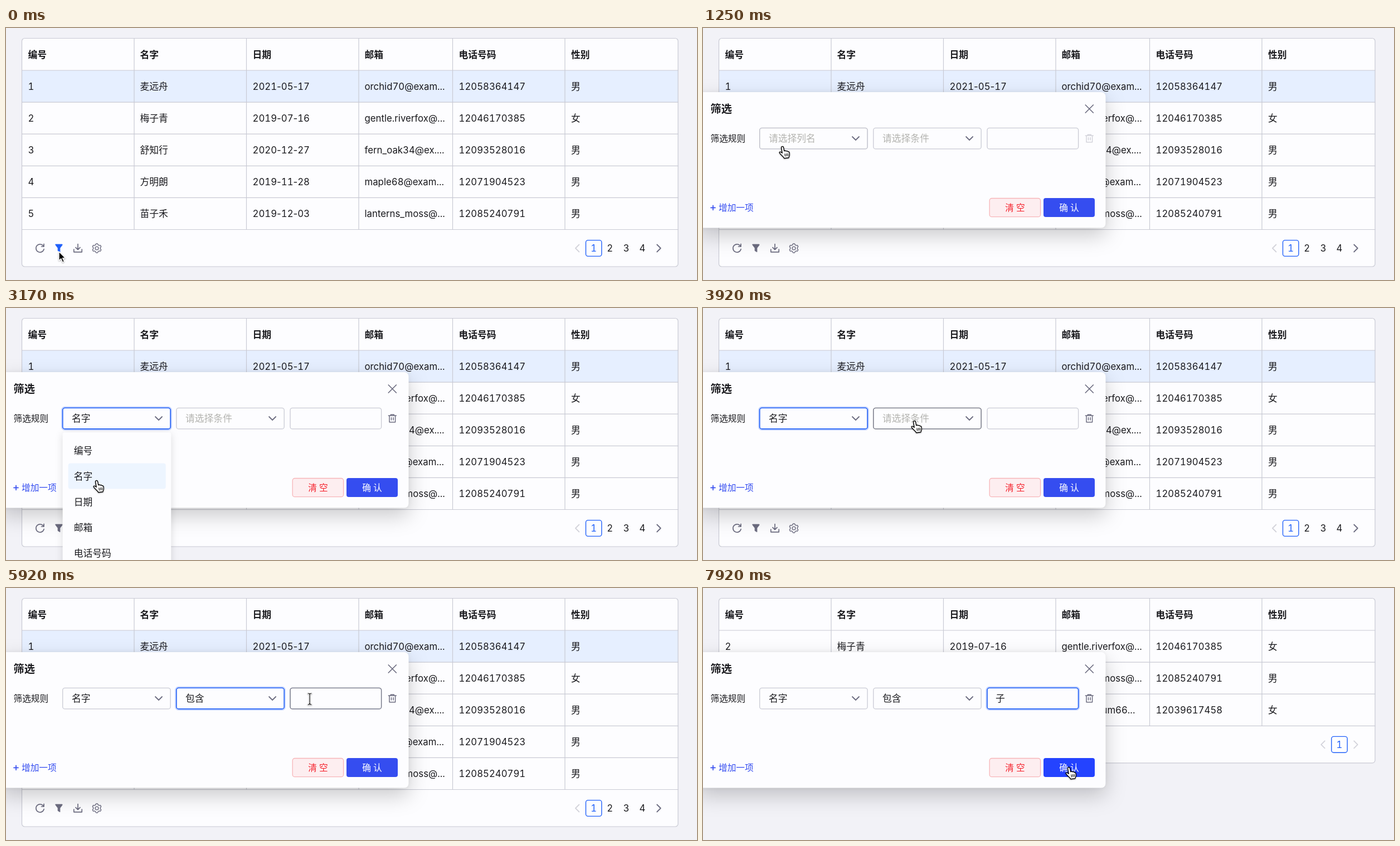
An HTML page for the animation above (8000 ms loop, 1240 by 452 pixels).

```html
<!DOCTYPE html>
<html lang="zh-CN">
<head>
<meta charset="utf-8">
<title>表格筛选</title>
<style>
html, body { margin: 0; width: 100%; height: 100%; overflow: hidden; background: #f2f2f7; }
svg { display: block; width: 1240px; height: 452px; }
text {
  font-family: Inter, 'Noto Sans CJK SC', 'Noto Sans CJK', sans-serif;
  font-variant-numeric: tabular-nums;
  white-space: pre;
}
.dash { font-variant-numeric: normal; }
.dialog { filter: drop-shadow(0 0 4px #0001) drop-shadow(0 14px 18px #0003); }
.menu { filter: drop-shadow(0 3px 7px #0002); }
.ime { filter: drop-shadow(0 0 1px #0008) drop-shadow(0 4px 5px #0004); }
.cursor { filter: drop-shadow(0 1px 1px #0005); }
</style>
</head>
<body>
<svg id="stage" viewBox="0 0 1240 452"></svg>
<script>
const LOOP = 8000, STEP = 1000 / 12;
const INK = '#19191d', ICON = '#6c6c80', LINE = '#c9cad4', PALE = '#d3d3db',
  PAPER = '#fdfdff', HINT = '#b3b3af', BLUE = '#2060fa', ACCENT = '#354df0', HOVER = '#edf5ff';

const COLUMNS = [28.5, 230, 431.5, 633, 801.5, 1003];
const TEXT_X = [39.5, 240.5, 442.5, 643.5, 812.5, 1014];
const HEAD = ['编号', '名字', '日期', '邮箱', '电话号码', '性别'];
const PEOPLE = [
  ['1', '麦远舟', '2021-05-17', 'orchid70@exam...', '12058364147', '男'],
  ['2', '梅子青', '2019-07-16', 'gentle.riverfox@...', '12046170385', '女'],
  ['3', '舒知行', '2020-12-27', 'fern_oak34@ex....', '12093528016', '男'],
  ['4', '方明朗', '2019-11-28', 'maple68@exam...', '12071904523', '男'],
  ['5', '苗子禾', '2019-12-03', 'lanterns_moss@...', '12085240791', '男']
];
const MATCHES = [PEOPLE[1], PEOPLE[4], ['9', '叶子溪', '2020-03-08', 'willow_plum66...', '12039617458', '女']];

const clamp = v => Math.max(0, Math.min(1, v));
const ramp = (t, a, b) => clamp((t - a) / (b - a));
const smooth = p => p * p * (3 - 2 * p);
const easeOut = p => 1 - (1 - p) ** 3;
const between = (t, a, b) => t >= a && t < b;

function text(x, y, str, { size = 16.8, fill = INK, weight = 400, anchor = 'start' } = {}) {
  const body = String(str).replace(/-/g, '<tspan class="dash">-</tspan>');
  return `<text x="${x}" y="${y + size * .365}" font-size="${size}" fill="${fill}" font-weight="${weight}" text-anchor="${anchor}">${body}</text>`;
}
function rect(x, y, w, h, r, fill, extra = '') {
  return `<rect x="${x}" y="${y}" width="${w}" height="${h}" rx="${r}" fill="${fill}" ${extra}/>`;
}
function path(d, stroke, width = 1.2, fill = 'none') {
  return `<path d="${d}" fill="${fill}" stroke="${stroke}" stroke-width="${width}" stroke-linecap="round" stroke-linejoin="round"/>`;
}
const at = (x, y, body, turn = 0) => `<g transform="translate(${x} ${y}) rotate(${turn})">${body}</g>`;
const fade = (opacity, body) => opacity > 0 ? `<g opacity="${opacity}">${body}</g>` : '';
const grow = (x, y, scale, body) =>
  `<g transform="translate(${x} ${y}) scale(${scale}) translate(${-x} ${-y})">${body}</g>`;

const chevron = (x, y, color, turn = 0, s = 6) =>
  at(x, y, path(`M${-s} ${-s / 2}L0 ${s / 2}L${s} ${-s / 2}`, color, 1.8), turn);

const GEAR = Array.from({ length: 72 }, (_, i) => {
  const a = i * Math.PI / 36;
  const r = 7.3 - .9 * Math.max(-1, Math.min(1, 2 * Math.cos(6 * a)));
  return `${(r * Math.cos(a)).toFixed(2)} ${(r * Math.sin(a)).toFixed(2)}`;
}).join('L');

function toolbar(y, filterColor) {
  return at(61, y, path('M6.6 -3A7.2 7.2 0 1 0 7.1 1.6M7 -7.6V-3H2.6', ICON, 1.7)) +
    at(95, y, path('M-6 -7H6V-5.8L1.9 -.2V6.8L-1.9 4.6V-.2L-6 -5.8Z', filterColor, .8, filterColor)) +
    at(129, y, path('M0 -7.5V2.4M-4 -1.4L0 2.6L4 -1.4M-7.2 2V6.8H7.2V2', ICON, 1.7)) +
    at(163, y, path(`M${GEAR}Z`, ICON, 1.4) + `<circle r="2.9" fill="none" stroke="${ICON}" stroke-width="1.4"/>`);
}

function pager(y, pages, active) {
  const first = 1142 - 29.1 * (pages - 1);
  let out = chevron(first - 29.5, y, PALE, 90, 6.5) + chevron(1171.5, y, pages > 1 ? ICON : PALE, -90, 6.5);
  if (active) out += rect(first - 14.2, y - 14.4, 28.4, 28.8, 4, 'none', `stroke="${BLUE}" stroke-width="1.4"`);
  for (let i = 0; i < pages; i++) {
    out += text(first + 29.1 * i, y, i + 1, { fill: active && !i ? BLUE : INK, anchor: 'middle' });
  }
  return out;
}

function table(t) {
  const empty = between(t, 6490, 6990);
  const rows = t < 6490 ? PEOPLE : empty ? [] : MATCHES;
  const rowY = i => 76 + 57.1 * i;
  const foot = empty ? 268.5 : rowY(rows.length);
  const mid = foot + 33.5;
  let out = rect(28.5, 18.5, 1177.5, foot + 48, 5, PAPER);
  if (t < 6490) out += rect(28.5, 76, 1177.5, 57, 0, '#e6efff');
  const gridEnd = empty ? 76 : foot;
  let grid = COLUMNS.slice(1).map(x => `M${x} 18.5V${gridEnd}`).join('') + `M28.5 ${foot}H1206`;
  HEAD.forEach((h, i) => { out += text(TEXT_X[i], 47.5, h, { weight: 600 }); });
  grid += 'M28.5 76H1206';
  rows.forEach((row, r) => {
    grid += `M28.5 ${rowY(r + 1)}H1206`;
    row.forEach((cell, i) => { out += text(TEXT_X[i], rowY(r) + 28.7, cell); });
  });
  out += path(grid, LINE) + rect(28.5, 18.5, 1177.5, foot + 48, 5, 'none', `stroke="${LINE}" stroke-width="1.2"`);
  return out + toolbar(mid, t < 330 ? BLUE : ICON) + pager(mid, t < 6490 ? 4 : 1, !empty);
}

function field(x, w, hover, focus) {
  const box = (color, width) => rect(x, 179.3, w, 37.6, 4, 'none', `stroke="${color}" stroke-width="${width}"`);
  return fade(focus, box('#c5d5ff', 5.5)) + rect(x, 179.3, w, 37.6, 4, PAPER, `stroke="${LINE}" stroke-width="1.3"`) +
    fade(hover, box('#70727f', 1.3)) + fade(focus, box(BLUE, 1.6));
}

function select(t, x, hint, value, s) {
  const chosen = t >= s.pick;
  const open = ramp(t, s.open, s.open + 250) * (1 - ramp(t, s.pick - 20, s.pick + 60));
  const focus = ramp(t, s.open, s.open + 200) * (1 - ramp(t, s.blur, s.blur + 200));
  const hover = ramp(t, s.enter, s.enter + 250) * (1 - ramp(t, s.leave, s.leave + 200));
  return field(x, 193.4, hover, focus) +
    text(x + 16.2, 198.3, chosen ? value : hint, { fill: chosen ? INK : HINT }) +
    chevron(x + 172.3, 198, open > .5 ? BLUE : ICON, 180 * open);
}

function menu(t, x, items, s, lit, scroll) {
  const show = easeOut(ramp(t, s.open - 60, s.open + 250)) * (1 - ramp(t, s.pick + 90, s.pick + 400));
  if (!show) return '';
  let out = rect(x, 223, 194.5, 260, 4, PAPER, 'class="menu"');
  items.forEach((item, i) => {
    const y = 255.4 + 46.2 * i;
    out += fade(lit[i] || 0, rect(x + 10, y - 23, scroll ? 155 : 175, 46, 4, HOVER));
    out += text(x + 20, y, item, { fill: scroll && !i && t >= s.pick ? ACCENT : INK });
  });
  if (scroll) out += rect(x + 171.3, 238, 7.4, 198, 3.7, '#dddfe5');
  return fade(show, grow(x + 97, 223, .9 + .1 * show, out));
}

const COLUMN_PICK = { enter: 1210, leave: 2250, open: 1580, pick: 3080, blur: 3960 };
const RULE_PICK = { enter: 3570, leave: 4500, open: 3990, pick: 4740, blur: 5910 };

function entry(t) {
  const hover = ramp(t, 5400, 5650) * (1 - ramp(t, 5910, 6100));
  let out = field(510, 163.6, hover, ramp(t, 5910, 6160));
  const typing = between(t, 6410, 6990);
  if (typing) out += text(525, 198.3, 'z') + path('M525 207.5H533', INK, 1);
  if (t >= 6990) out += text(525, 198.3, '子');
  const caret = typing ? 533.5 : t >= 6990 ? 543 : 525.5;
  if (between(t, 5990, 7400)) out += path(`M${caret} 190V207`, INK, 1.1);
  return out;
}

function dialog(t) {
  if (t < 245) return '';
  const p = easeOut(ramp(t, 190, 500));
  const bin = t < 3080 ? PALE : ICON;
  const ok = t >= 7910 ? '#2443ff' : t >= 7660 ? '#4459f5' : ACCENT;
  const body = rect(-10, 115, 732.5, 243.5, 8, PAPER, 'class="dialog"') +
    text(13.5, 145.3, '筛选', { size: 19.2, weight: 600 }) +
    at(693.3, 145, path('M-7 -7L7 7M7 -7L-7 7', ICON, 1.7)) +
    text(13.5, 198.5, '筛选规则', { size: 15.7 }) +
    select(t, 101.7, '请选择列名', '名字', COLUMN_PICK) +
    select(t, 305.8, '请选择条件', '包含', RULE_PICK) +
    entry(t) +
    at(693.3, 198, path('M-7 -5H7M-5.3 -5V6.8H5.3V-5M-3 -5V-6.8H3V-5M-1.8 -1.4V3M1.8 -1.4V3', bin, 1.5)) +
    path('M14 322.3H22M18 318.3V326.3', ACCENT, 1.7) +
    text(28, 322.5, '增加一项', { size: 15.7, fill: ACCENT }) +
    rect(514.2, 305.5, 91.4, 33.2, 4, '#fdeef0', 'stroke="#f7b5b8" stroke-width="1.3"') +
    text(560, 322.5, '清 空', { size: 15.7, fill: '#f5222d', anchor: 'middle' }) +
    rect(611, 305, 92, 34, 4, ok) +
    text(657, 322.5, '确 认', { size: 15.7, fill: '#fff', anchor: 'middle' });
  return p < 1 ? fade(p, grow(95, 401, .5 + .5 * p, body)) : body;
}

function candidates(t) {
  if (!between(t, 6410, 6990)) return '';
  let out = rect(505, 213.5, 493, 39, 10, PAPER, 'class="ime"') + rect(509, 217.5, 42, 31.5, 6, '#0a48cc');
  [...'子中 这张再咋在找'].forEach((ch, i) => {
    const x = 512.5 + 49.2 * i + (i > 2 ? 8 : 0);
    out += text(x, 233.6, i + 1, { size: 15, fill: i ? '#6d6d72' : '#fff' });
    out += text(x + 12.3, 232.8, ch, { size: 19.2, fill: i ? INK : '#fff' });
  });
  out += rect(627.5, 221, 18.5, 23.5, 2, '#b49a7c') + rect(627.5, 221, 15.5, 20.5, 2, '#cbb698') +
    text(636, 231.5, '中', { size: 16, fill: '#a3141c', anchor: 'middle' });
  return out + chevron(978, 233.8, ICON, 0, 6.5);
}

// time, x, y of the pointer's hot spot
const ROUTE = [
  [0, 95, 401], [880, 95, 401], [1250, 144, 213], [1420, 150, 208], [2180, 150, 208],
  [2417, 160, 289], [2750, 164, 310], [3300, 164, 310], [3833, 381, 203], [4350, 381, 203],
  [4667, 372, 248], [4880, 372, 248], [5170, 420, 234], [5500, 545, 185], [5667, 545, 199],
  [7260, 545, 199], [7500, 635, 288], [7600, 635, 288], [7750, 658, 322], [LOOP, 658, 322]
];
function pointerAt(t) {
  const i = Math.max(1, ROUTE.findIndex(k => k[0] >= t));
  const [a, ax, ay] = ROUTE[i - 1], [b, bx, by] = ROUTE[i];
  const p = smooth(ramp(t, a, b));
  return [ax + (bx - ax) * p, ay + (by - ay) * p];
}

const ARROW = path('M0 0V16.2L3.8 12.7L6.6 19.2L9.4 18L6.6 11.7H11.7Z', '#fff', 1.3, '#000');
const HAND = at(-1.5, -.7,
  path('M-2 2Q-1.6 -.2 .5 .2Q2 .6 2.3 3L3.2 8.3Q5 6.8 6.6 8.6Q8.6 7.6 9.9 9.6Q12 9 12.6 11.5Q13.6 16 11.3 20.4L3.3 21.4Q2 19 -1 16.4Q-4.6 13 -5.4 11.2Q-5 9 -2.6 10.3L-.3 12Z', '#000', 1.4, '#fff') +
  path('M4.4 13.5L5 17.7M7 13.2L7.6 17.4M9.6 12.8L10.1 17', '#000', 1.1));
const BEAM_LINE = 'M-3 -10Q0 -10 0 -8V8Q0 10 -3 10M3 -10Q0 -10 0 -8M0 8Q0 10 3 10';
const BEAM = path(BEAM_LINE, '#fff', 2.6) + path(BEAM_LINE, '#111', 1.2);

function pointer(t) {
  if (between(t, 6410, 7320)) return '';
  const [x, y] = pointerAt(t);
  const within = (l, top, r, b) => x >= l && x <= r && y >= top && y <= b;
  const menuOpen = between(t, 1580, 3400) || between(t, 3990, 5000);
  let shape = ARROW;
  if (t > 500) {
    if (within(510, 179, 674, 217)) shape = BEAM;
    else if (within(101, 179, 500, 217) || within(611, 305, 703, 339) || (menuOpen && y > 217)) shape = HAND;
  }
  return at(x, y, `<g class="cursor">${shape}</g>`);
}

function scene(t) {
  const litColumn = [1 - ramp(t, 2300, 2480), ramp(t, 2420, 2590)];
  return rect(0, 0, 1240, 452, 0, '#f2f2f7') + table(t) + dialog(t) +
    menu(t, 101.7, HEAD, COLUMN_PICK, litColumn, false) +
    menu(t, 305.8, ['包含', '不包含', '等于', '不等于', '为空'], RULE_PICK, [1], true) +
    candidates(t) + pointer(t);
}

const stage = document.getElementById('stage');
let drawn = -1;
function frame() {
  const step = Math.floor((performance.now() % LOOP + 6) / STEP);
  if (step !== drawn) {
    drawn = step;
    stage.innerHTML = scene(Math.min(step * STEP, LOOP));
  }
  requestAnimationFrame(frame);
}
frame();
</script>
</body>
</html>
```
